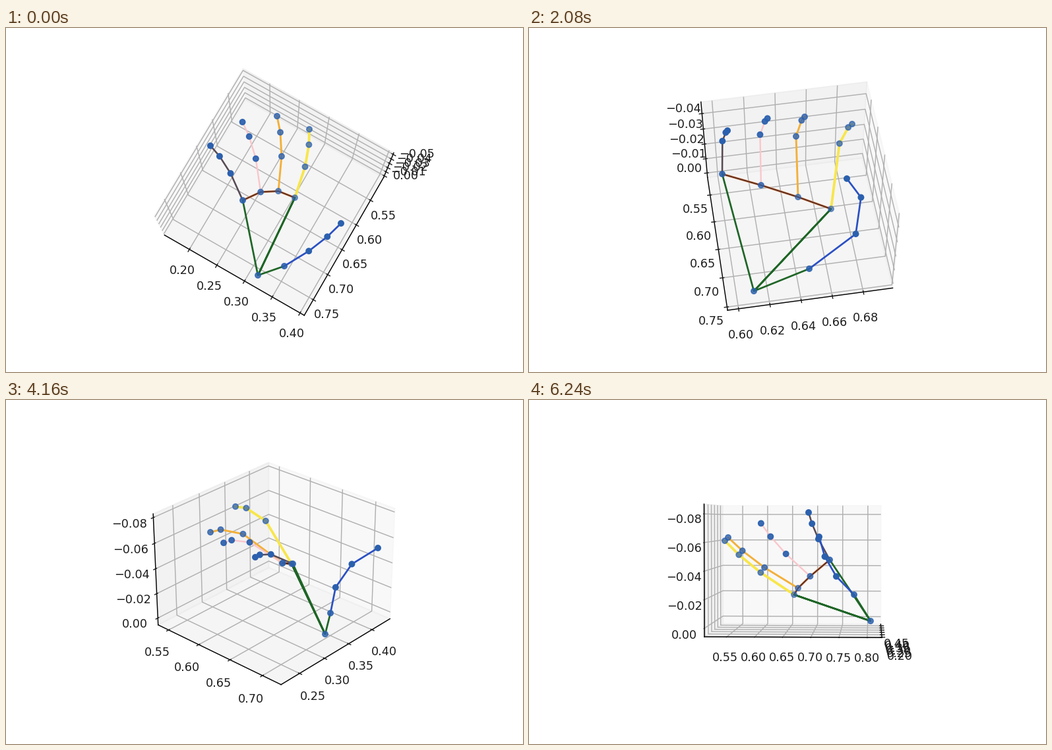
A matplotlib script for the animation above (6400 ms loop, 784 px wide and 523 px high).

```python
import numpy as np
import matplotlib.pyplot as plt
from matplotlib.animation import FuncAnimation
from matplotlib.colors import to_rgba
from matplotlib.ticker import FixedLocator, MaxNLocator

W, H, DPI = 784, 523, 128
FRAMES, INTERVAL = 40, 160
PT = 10.2 / 10  # one nominal point at this resolution

plt.rcParams.update({
    "font.family": "DejaVu Sans", "font.size": 9.7 * PT,
    "xtick.color": "#1c1c1c", "ytick.color": "#1c1c1c",
    "grid.linewidth": 0.8 * PT, "axes.linewidth": 0.8 * PT,
})

KEYS = [0, 6, 13, 19, 26, 31, 39]


def track(*values):
    """A value that moves evenly from key to key."""
    return lambda frame: np.interp(frame, KEYS, values)


# Stage points are complex numbers, x + y*j
wrist = track(382+376j, 318+370j, 341+400j, 430+393j,
              484+356j, 517+343j, 518+336j)
thumb_base = track(422+362j, 369+360j, 425+366j, 482+330j,
                   492+324j, 506+297j, 493+296j)
thumb_tip = track(508+297j, 508+310j, 482+229j, 481+186j,
                  564+225j, 479+187j, 440+208j)
index_base = track(438+258j, 404+267j, 458+275j, 434+279j,
                   433+249j, 412+288j, 402+296j)
index_tip = track(460+154j, 476+192j, 490+146j, 434+133j,
                  348+162j, 311+200j, 297+214j)
middle_base = track(413+248j, 376+248j, 408+257j, 388+274j,
                    419+248j, 407+284j, 408+286j)
middle_tip = track(411+134j, 448+141j, 418+135j, 366+146j,
                   310+201j, 291+207j, 302+209j)
pinky_base = track(359+262j, 308+239j, 293+222j, 310+256j,
                   435+249j, 435+259j, 456+243j)
pinky_tip = track(310+179j, 324+146j, 301+156j, 298+189j,
                  378+239j, 367+206j, 424+171j)

# Scale and turn from one bone to the next
thumb_curl = track(.81-.09j, .89+.08j, .45-.45j, .63-.40j,
                   .99+.43j, .95+.18j, .87+.22j)
finger_curl = track(.68-.10j, .60+.26j, .26+.10j, .40+.14j,
                    .42-.20j, .72+.02j, .70+.07j)

# Axis ranges; z always ends just past zero
x_mid = track(.281, .645, .646, .4775, .327, .342, .341)
x_span = track(.253, .194, .106, .1204, .226, .300, .298)
y_mid = track(.642, .620, .636, .605, .630, .659, .668)
y_span = track(.278, .279, .239, .266, .1955, .325, .316)
z_span = track(.0568, .0743, .0506, .0502, .0885, .0985, .0928)


def digit(base, tip, curl):
    """Four joints; every bone is the one before times the curl."""
    reach = np.cumsum([0, 1, curl, curl ** 2])
    return base + (tip - base) * reach / reach[-1]


def hand(frame):
    """Joints of thumb, index, middle, ring and pinky."""
    index, middle, pinky = index_base(frame), middle_base(frame), pinky_base(frame)
    middle_end, pinky_end = middle_tip(frame), pinky_tip(frame)

    # The ring finger follows its neighbours along the arch of knuckles
    ring = middle + 0.34 * (pinky - index)
    ring_end = ring + 0.54 * (middle_end - middle + pinky_end - pinky)

    curl = finger_curl(frame)
    return [
        digit(thumb_base(frame), thumb_tip(frame), thumb_curl(frame)),
        digit(index, index_tip(frame), curl),
        digit(middle, middle_end, curl),
        digit(ring, ring_end, curl),
        digit(pinky, pinky_end, curl),
    ]


fig = plt.figure(figsize=(W / DPI, H / DPI), dpi=DPI, facecolor="white")
fig.subplots_adjust(left=0.125, right=0.9, bottom=0.125, top=0.88)
box = fig.add_subplot(projection="3d")

stage = fig.add_axes([0, 0, 1, 1], zorder=5)
stage.set(xlim=(0, W), ylim=(H, 0))
stage.axis("off")


def line(color, width, z=2):
    return stage.plot([], [], color=color, lw=width * PT, zorder=z)[0]


def place(artist, points):
    points = np.asarray(points)
    artist.set_data(points.real, points.imag)


finger_lines = [
    line("#2a50c4", 1.5, 3),
    line("#f8e64a", 2.1),
    line("#f3b038", 1.6),
    line("#fac6cc", 1.3),
    line("#574a54", 1.4),
]
knuckle_lines = [line("#e6a47c", 1.9), line("#5c2a18", 1.1, 2.1)]
palm_line = line("#1f6627", 1.5, 2.2)

# Dots fade with depth: the wrist, then each digit with a paler knuckle
shades = [0.8]
for shade in (1, 0.72, 0.78, 0.92, 1):
    shades += [0.85 * shade] + 3 * [shade]
dots = stage.scatter(np.zeros(21), np.zeros(21), s=20 * PT ** 2, lw=PT, zorder=4,
                     color=[to_rgba("#2b60ae", shade) for shade in shades])


def set_axis(axis, set_lim, low, span):
    """Set the range and keep ticks out of its padding."""
    high, pad = low + span, span / 50
    set_lim(low, high)
    locator = MaxNLocator(7, steps=[1, 2, 2.5, 5, 10])
    ticks = locator.tick_values(low + pad, high - pad)
    inside = (ticks >= low + pad) & (ticks <= high - pad)
    axis.set_major_locator(FixedLocator(ticks[inside]))


def draw(frame):
    # The view is upside down, so negative z points up
    box.view_init(elev=-100 - 2 * frame, azim=-120 + 3 * frame)
    dx, dy, dz = x_span(frame), y_span(frame), z_span(frame)
    set_axis(box.xaxis, box.set_xlim, x_mid(frame) - dx / 2, dx)
    set_axis(box.yaxis, box.set_ylim, y_mid(frame) - dy / 2, dy)
    set_axis(box.zaxis, box.set_zlim, -0.936 * dz, dz)

    root, digits = wrist(frame), hand(frame)
    for artist, joints in zip(finger_lines, digits):
        place(artist, joints)

    thumb, *knuckles = [joints[0] for joints in digits]
    for artist in knuckle_lines:
        place(artist, knuckles)
    place(palm_line, [thumb, root, knuckles[0], root, knuckles[-1]])

    joints = np.hstack([root, *digits])
    dots.set_offsets(np.column_stack([joints.real, joints.imag]))
    return []


anim = FuncAnimation(fig, draw, frames=FRAMES, interval=INTERVAL,
                     init_func=lambda: draw(0), repeat=True, repeat_delay=0)
plt.show()
```
